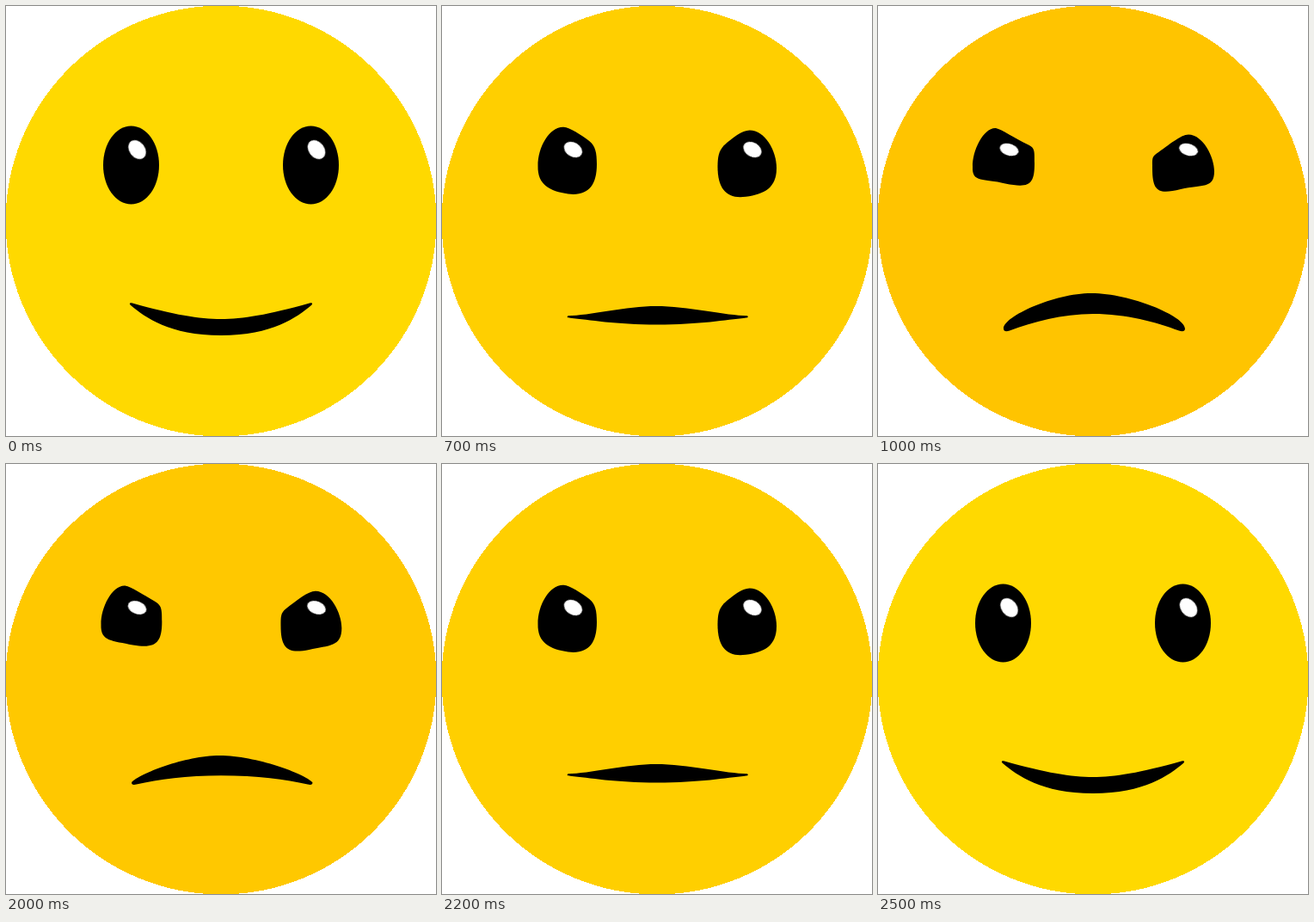
An HTML page without scripts that plays this animation: 500x500 px, repeating every 2.8 s.

```html
<!DOCTYPE html>
<html lang="en">
<head>
<meta charset="utf-8">
<title>Mood face</title>
<style>
  html, body { margin: 0; width: 100%; height: 100%; overflow: hidden; background: #fff; }
  svg { display: block; width: 100%; height: 100%; }

  .face, .morph, .glint {
    animation: 2800ms infinite;
    animation-timing-function: steps(6, start);
  }
  .face { fill: #ffd900; animation-name: tint; }
  .morph { d: var(--happy); animation-name: morph; }
  .glint { fill: #fff; animation-name: squash; }

  .left {
    --happy: path("M145.5 139.5C154.5 139.5 162.6 144.6 168.5 152.8C174.4 161 178 172.4 178 185C178 210.1 163.5 230.5 145.5 230.5C127.5 230.5 113 210.1 113 185C113 159.9 127.5 139.5 145.5 139.5Z");
    --angry: path("M137 142C144 143.5 159 154 174 161C182.5 165 182 168 182 183C182 208 176 212 148 206.5C123 200 109 206 110 187C109.5 168 123 141 137 142Z");
  }
  .right {
    --happy: path("M354.5 139.5C345.5 139.5 337.4 144.6 331.5 152.8C325.6 161 322 172.4 322 185C322 210.1 336.5 230.5 354.5 230.5C372.5 230.5 387 210.1 387 185C387 159.9 372.5 139.5 354.5 139.5Z");
    --angry: path("M361 149.5C352 149.5 338 162 324 171.5C318 176 319 178 319 189C319 217 327 219 352 213C377 207 391 213 391 192C391 176 378 149.5 361 149.5Z");
  }
  .mouth {
    --happy: path("M147 345.5C195 359 225 364 250 364C275 364 305 359 353 345.5C356.5 344.5 357 346 355 348C338 362 310 383 250 383C190 383 162 362 145 348C143 346 143.5 344.5 147 345.5Z");
    --angry: path("M146 375C146 361 205 334 248 334C294 334 357 361 357 375C357 378.5 354 379 350 377.5C323 367.5 289 358 250 358C214 358 180 367.5 153 377.5C149 379 146 378.5 146 375Z");
  }

  /* Six 100 ms steps each way, the first one taken at once */
  @keyframes tint {
    0%, 17.856%, 92.855%, 100% { fill: #ffd900; }
    39.284%, 71.427% { fill: #ffc400; }
  }
  @keyframes morph {
    0%, 17.856%, 92.855%, 100% { d: var(--happy); }
    39.284%, 71.427% { d: var(--angry); }
  }
  @keyframes squash {
    0%, 17.856%, 92.855%, 100% { transform: scale(1, 1); }
    39.284%, 71.427% { transform: scale(1.06, .67); }
  }
</style>
</head>
<body>
<svg viewBox="0 0 500 500">
  <circle class="face" cx="250" cy="250" r="250.5" shape-rendering="crispEdges"/>
  <path class="morph left"/>
  <path class="morph right"/>
  <path class="morph mouth"/>
  <g transform="translate(152.5 167)">
    <g class="glint"><ellipse rx="9" ry="12" transform="rotate(-38)"/></g>
  </g>
  <g transform="translate(361 167)">
    <g class="glint"><ellipse rx="9" ry="12" transform="rotate(-38)"/></g>
  </g>
</svg>
</body>
</html>
```
